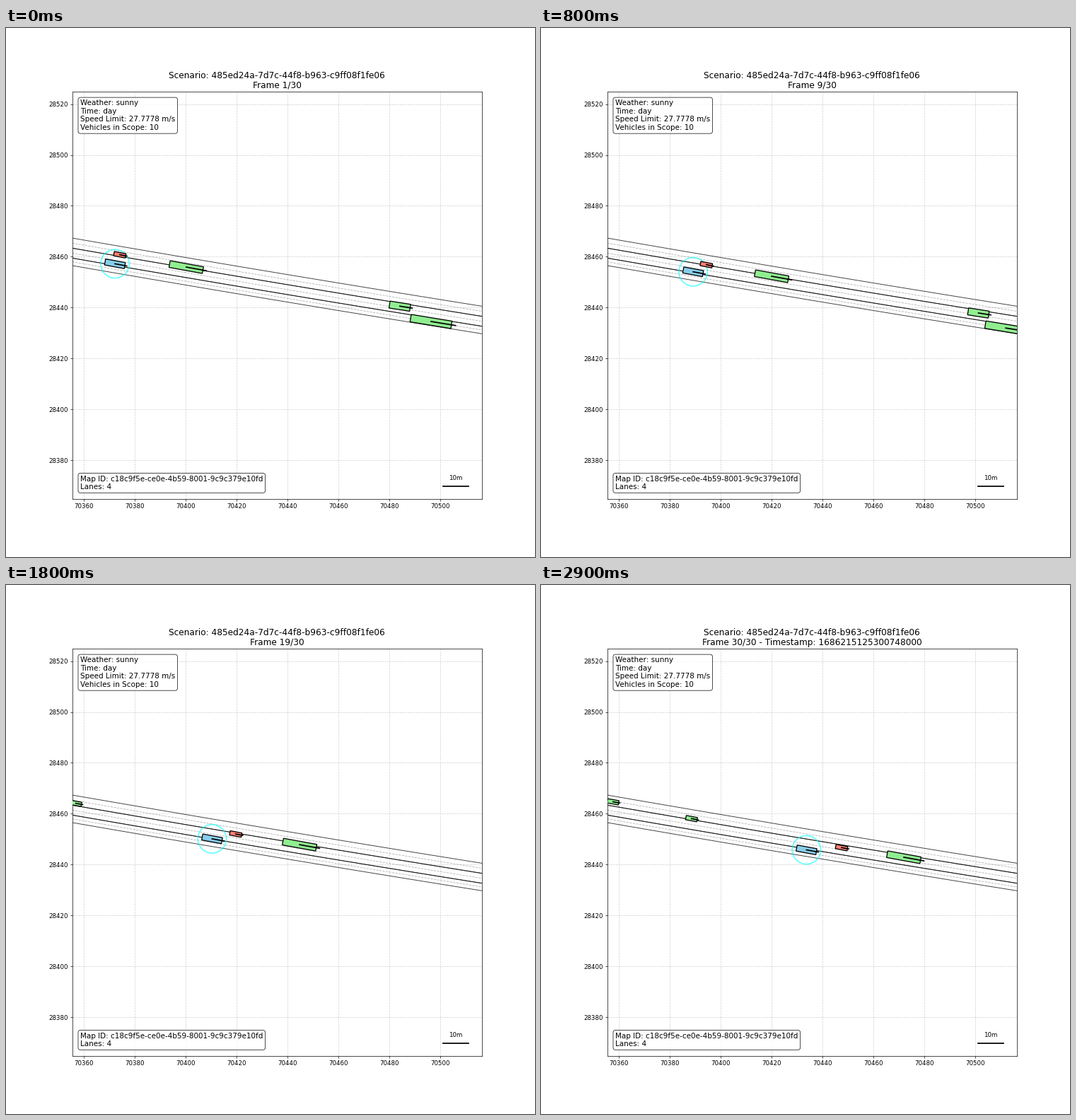
A matplotlib script that plays this animation: 748x748 px, repeating every 3 s.

```python
import numpy as np
import matplotlib.pyplot as plt
from matplotlib.animation import FuncAnimation
from matplotlib.patches import Circle, Polygon

FRAMES = 30
ORIGIN = np.array([70360, 28440])  # vehicle and lane data are metres from here
LEFT, RIGHT = -4.72, 156.31
BOTTOM, TOP = -75.07, 84.93
SCENARIO = "485ed24a-7d7c-44f8-b963-c9ff08f1fe06"
MAP_ID = "c18c9f5e-ce0e-4b59-8001-9c9c379e10fd"
LAST_STAMP = 1686215125300748000

# The road bends gently: its slope eases from left to right.
SLOPE, BEND = 0.1733, 8.6e-5
BORDERS = [27.36, 23.4, 19.5, 16.55]

# colour, length, width, start, velocity per frame
VEHICLES = [
    ("skyblue", 7.9, 2.4, (12.1, 17.25), (2.12, -0.394)),
    ("salmon", 4.7, 1.7, (14.0, 20.8), (2.53, -0.486)),
    ("lightgreen", 13.3, 2.65, (40.1, 15.95), (2.473, -0.449)),
    ("lightgreen", 8.2, 2.75, (124.0, 0.6), (2.14, -0.335)),
    ("lightgreen", 16.25, 2.95, (136.25, -5.42), (1.95, -0.32)),
    ("lightgreen", 4.5, 1.7, (-55.1, 33.9), (2.88, -0.545)),
    ("lightgreen", 4.5, 1.7, (-83.6, 39.2), (2.8, -0.5)),
]


def draw_lane(ax, upper, lower):
    u = np.linspace(-5, RIGHT - LEFT + 5, 60)
    drop = SLOPE * u - BEND * u ** 2 / 2
    x = ORIGIN[0] + LEFT + u
    for base in (upper, lower):
        ax.plot(x, ORIGIN[1] + base - drop, "k-", lw=1.1, alpha=0.75)
    ax.plot(x, ORIGIN[1] + (upper + lower) / 2 - drop, "--",
            color="gray", lw=1, alpha=0.6)


class Vehicle:
    def __init__(self, ax, color, length, width, start, velocity):
        self.start = ORIGIN + np.array(start)
        self.velocity = np.array(velocity)
        ahead = self.velocity / np.hypot(*velocity) * length
        side = np.array([-ahead[1], ahead[0]]) * width / length
        self.corners = np.array([-ahead - side, ahead - side,
                                 ahead + side, side - ahead]) / 2
        self.reach = 0.6 * ahead
        self.body = ax.add_patch(Polygon(self.corners, facecolor=color,
                                         edgecolor="black", lw=1.5, zorder=10))
        self.pointer, = ax.plot([], [], "k-", lw=2, zorder=11)

    def move(self, frame):
        center = self.start + frame * self.velocity
        self.body.set_xy(self.corners + center)
        self.pointer.set_data(*zip(center, center + self.reach))
        return center


plt.rcParams["font.family"] = "DejaVu Sans"
fig, ax = plt.subplots(figsize=(12, 12), dpi=748 / 12)
ax.set_xlim(ORIGIN[0] + LEFT, ORIGIN[0] + RIGHT)
ax.set_ylim(ORIGIN[1] + BOTTOM, ORIGIN[1] + TOP)
ax.grid(True, linestyle="--", alpha=0.6)

for upper, lower in zip(BORDERS, BORDERS[1:]):
    draw_lane(ax, upper, lower)

vehicles = [Vehicle(ax, *spec) for spec in VEHICLES]
halo = ax.add_patch(Circle((0, 0), 5.6, fill=False, edgecolor="cyan",
                           lw=2, alpha=0.6, zorder=9))

box = dict(boxstyle="round", facecolor="white", alpha=0.8)
info = "Weather: sunny\nTime: day\nSpeed Limit: 27.7778 m/s\nVehicles in Scope: 10"
ax.text(0.02, 0.98, info, transform=ax.transAxes, fontsize=12,
        va="top", bbox=box, zorder=20)
ax.text(0.02, 0.02, f"Map ID: {MAP_ID}\nLanes: 4", transform=ax.transAxes,
        fontsize=12, va="bottom", bbox=box, zorder=20)

# Scale bar
bar_x, bar_y = ORIGIN + [140.85, BOTTOM + 5]
ax.plot([bar_x, bar_x + 10], [bar_y, bar_y], "k-", lw=2)
ax.text(bar_x + 5, bar_y + 2, "10m", ha="center", va="bottom", fontsize=10)

title = ax.set_title("", fontsize=14, linespacing=1.1)


def update(frame):
    centers = [v.move(frame) for v in vehicles]
    halo.center = tuple(centers[0])
    stamp = f" - Timestamp: {LAST_STAMP}" if frame == FRAMES - 1 else ""
    title.set_text(f"Scenario: {SCENARIO}\nFrame {frame + 1}/{FRAMES}{stamp}")
    return []


anim = FuncAnimation(fig, update, frames=FRAMES, interval=100,
                     init_func=lambda: [], repeat=True, repeat_delay=0)
plt.show()
```
